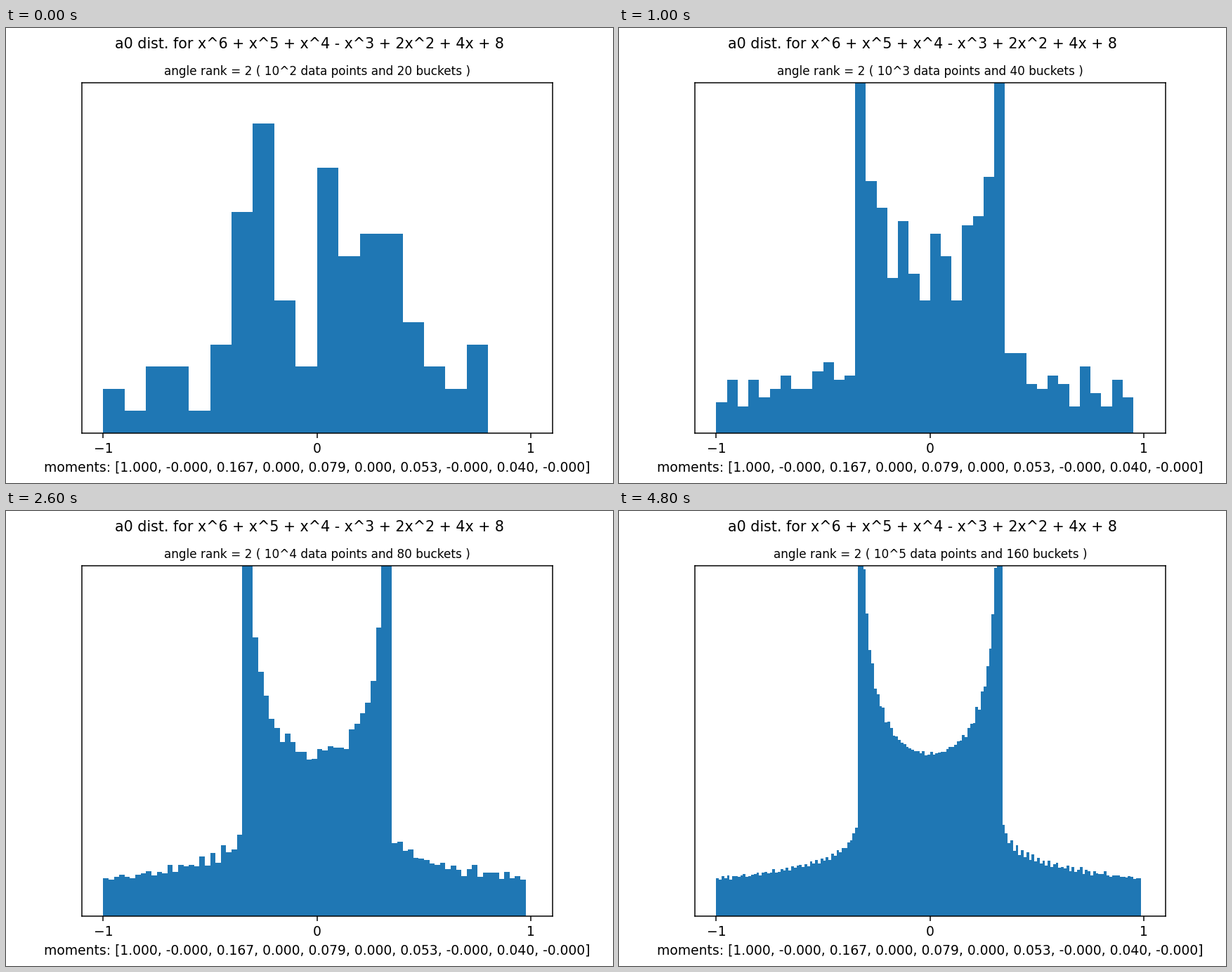
Animation of 864x648 px, one loop 6000 ms. Source, as a matplotlib script:

```python
import numpy as np
import matplotlib.pyplot as plt
from matplotlib.animation import FuncAnimation

plt.rcParams["font.family"] = "DejaVu Sans"

# Angles of the polynomial's roots, from y = x + 2/x with (y + 1)(y^2 - 5) = 0.
ANGLES = np.arccos(np.array([-1, np.sqrt(5), -np.sqrt(5)]) / (2 * np.sqrt(2)))
MOMENTS = "1.000, -0.000, 0.167, 0.000, 0.079, 0.000, 0.053, -0.000, 0.040, -0.000"
STEPS = 4
HOLD = 2  # extra ticks on the last step


def histogram(step):
    """Density of the normalised traces; the last bucket stays open."""
    points, buckets = 10 ** (step + 2), 20 * 2 ** step
    powers = np.arange(1, points + 1)
    traces = np.cos(np.outer(powers, ANGLES)).mean(axis=1)
    density, edges = np.histogram(traces, bins=buckets, range=(-1, 1), density=True)
    return density[:-1], edges[:-1]


histograms = [histogram(step) for step in range(STEPS)]

fig, ax = plt.subplots(figsize=(6.4, 4.8), dpi=135)
fig.suptitle("a0 dist. for x^6 + x^5 + x^4 - x^3 + 2x^2 + 4x + 8", fontsize=11)
title = ax.set_title("", fontsize=9)
bars = ax.stairs(*histograms[0], fill=True, color="#1f77b4")
ax.set(xlim=(-1.1, 1.1), ylim=(0, 1.585), xticks=[-1, 0, 1], yticks=[])
ax.set_xlabel(f"moments: [{MOMENTS}]")


def update(frame):
    step = min(frame, STEPS - 1)
    bars.set_data(*histograms[step])
    title.set_text(f"angle rank = 2 ( 10^{step + 2} data points "
                   f"and {20 * 2 ** step} buckets )")
    return bars, title


anim = FuncAnimation(fig, update, frames=STEPS + HOLD, interval=1000, repeat=True)
plt.show()
```
